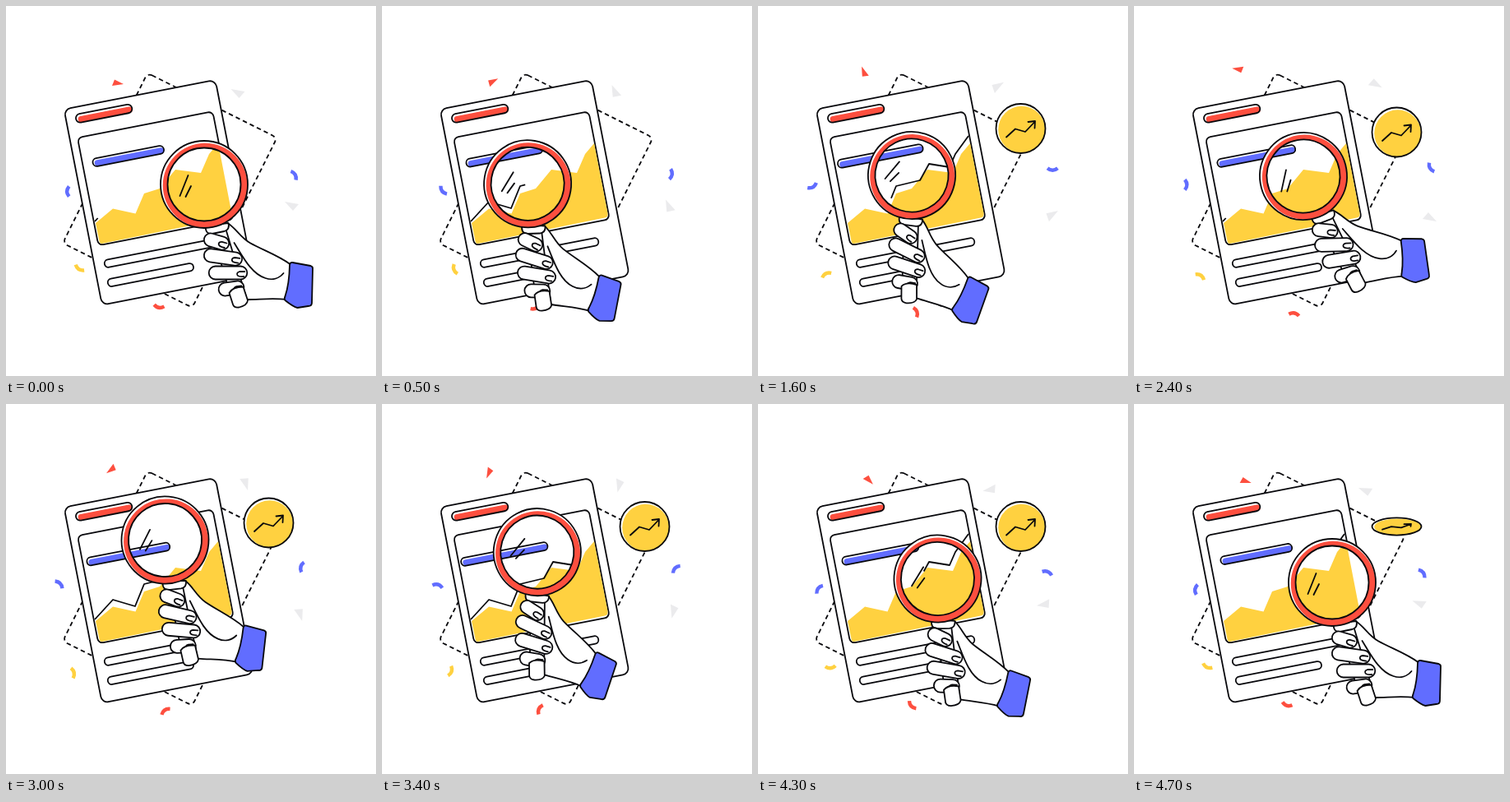
These frames come from a looping animation (450x450 px, 4.8 s). An HTML page:

```html
<!DOCTYPE html>
<html lang="en">
<head>
<meta charset="utf-8">
<title>Report under a magnifier</title>
<style>
  html, body { margin: 0; width: 100%; height: 100%; overflow: hidden; background: #fff; }
  svg { display: block; width: 100vw; height: 100vh; }
  .ink { fill: none; stroke: #08080c; stroke-width: 1.8; stroke-linecap: round; stroke-linejoin: round; }
  .flat { stroke-linecap: butt; }
  .paper { fill: #fff; }
  .red { fill: #fd4f3f; }
  .blue { fill: #616dff; }
  .yellow { fill: #ffd140; }
  .gray { fill: #ebebed; }
  .arc { fill: none; stroke-width: 4.4; }
  .arc.red { stroke: #fd4f3f; }
  .arc.blue { stroke: #616dff; }
  .arc.yellow { stroke: #ffd140; }
  #badge .ink { vector-effect: non-scaling-stroke; }
</style>
</head>
<body>
<svg viewBox="0 0 450 450">
  <rect class="ink flat" x="-88.5" y="-115" width="176" height="231" rx="6" stroke-dasharray="5.5 4"
        transform="translate(200 224) rotate(26.5)"/>

  <g id="confetti"></g>

  <g id="badge">
    <circle class="paper" r="30"/>
    <circle class="yellow" cx="1.2" cy="1.3" r="28.5"/>
    <circle class="ink" r="30"/>
    <path class="ink" d="M-17.5 10.5 L-6.5 .5 L5.5 4 L17.5 -8.5 M9 -8 L17.5 -9 L17 -.5"/>
  </g>

  <g transform="translate(186 227) rotate(-11)">
    <rect class="ink paper" x="-94" y="-121.5" width="187.500" height="242.5" rx="8"/>
    <rect class="ink" x="-84.5" y="-84.5" width="167.5" height="133.500" rx="6"/>
    <rect class="red" x="-79.5" y="-109.5" width="67" height="7.5" rx="3.7"/>
    <rect class="ink" x="-82" y="-112.5" width="69.5" height="10.5" rx="5.2"/>
    <rect class="ink" x="-81.5" y="68" width="146" height="9.5" rx="4.7"/>
    <rect class="ink" x="-82" y="91.5" width="106" height="9.5" rx="4.7"/>
  </g>

  <circle id="glass" class="paper" r="46"/>

  <path class="yellow" d="M109 264 L130 246.5 L157.5 252.5 L168 228 L187 222 L206 199 L237 203 L247 180 L258 167
                          L274.5 252 Q275 257 271 257.5 L119 288.5 Q114 290 113.5 286 Z"/>
  <path id="trend" class="ink flat" pathLength="1"
        d="M108 262 L130 238 L157 246 L168 219 L197 212 L208 192 L233 196 L240 180 L256 158"/>
  <g transform="translate(148.800 182.5) rotate(-11)">
    <rect id="barFill" class="blue" y="-2.5" height="7.5" rx="3.7"/>
    <rect id="barLine" class="ink" y="-5" height="10" rx="5"/>
  </g>

  <g id="hand">
    <path class="ink" d="M221 206 L211 231 M224.5 219 L218 232"/>

    <!-- palm, wrist and cuff -->
    <path class="paper" d="M269 264 C279 270 284 281 296 288 C312 297 330 303 345 314 L340 357 C325 355 308 357 293 357 L262 330 Z"/>
    <path class="ink" d="M269 264 C279 270 284 281 296 288 C312 297 330 303 345 314 M340 357 C325 355 308 357 293 357"/>
    <path class="ink" d="M277 288 C287 304 298 326 315 331 C324 334 332 331 337 325"/>
    <path class="ink blue" d="M348 312 L370 316 Q373 317 372.5 320 L371.5 361 Q371.500 365 367 365 L354 367 Q349 366 339 358 Q337.500 356 339 353 Q344 338 344.500 315 Q345 311.500 348 312 Z"/>

    <!-- handle, collar, fingers, handle end -->
    <path class="ink paper" d="M250 276 L274 356 L291 352 L267 272 Z"/>
    <path class="ink paper" d="M242 267 Q242 278 250 277 L265 274 Q272 272 270 264 Z"/>
    <g id="fingers"></g>
    <path class="ink paper" d="M271 349 Q275 341.500 288 341.500 L293.500 358 Q293 364 283 366.500 Q277 367.500 275.500 363 Z"/>

    <!-- rim, lit from the upper left -->
    <g transform="translate(240.5 217)">
      <circle r="48.7" fill="none" stroke="#fff" stroke-width="8.5"/>
      <path class="red" fill-rule="evenodd"
            d="M-50.3 1.3 a51.5 51.5 0 1 0 103 0 a51.5 51.5 0 1 0 -103 0 M-44.5 0 a44.5 44.5 0 1 0 89 0 a44.5 44.5 0 1 0 -89 0"/>
      <circle class="ink" r="53"/>
      <circle class="ink" r="44.500"/>
    </g>
  </g>
</svg>

<script>
const LOOP = 4800, STEP = 100, TAU = 2 * Math.PI;
const $ = id => document.getElementById(id);
const ramp = (t, from, to) => Math.min(1, Math.max(0, (t - from) / (to - from)));
const smooth = u => u * u * (3 - 2 * u);

function set(el, attrs) {
  for (const name in attrs) el.setAttribute(name, attrs[name]);
  return el;
}
const add = (parent, tag, attrs) =>
  parent.appendChild(set(document.createElementNS('http://www.w3.org/2000/svg', tag), attrs));

// Smooth curve through keys [time, ...values], without overshoot.
function curve(keys, t) {
  let i = 0;
  while (i < keys.length - 2 && t >= keys[i + 1][0]) i++;
  const a = keys[i], b = keys[i + 1], u = ramp(t, a[0], b[0]);
  const slope = (k, c) => (keys[k + 1][c] - keys[k][c]) / (keys[k + 1][0] - keys[k][0]);
  const tangent = (k, c) => {
    if (k < 1 || k > keys.length - 2) return 0;
    const p = slope(k - 1, c), q = slope(k, c);
    return p * q > 0 ? 2 * p * q / (p + q) : 0;
  };
  return a.slice(1).map((from, n) => {
    const c = n + 1, pull = (1 - u) * tangent(i, c) - u * tangent(i + 1, c);
    return from + (b[c] - from) * smooth(u) + (b[0] - a[0]) * u * (1 - u) * pull;
  });
}

// Poses of the magnifier: time, lens x, lens y, turn.
const rest = [241, 217, 0];
const poses = [
  [0, ...rest], [600, 172, 216, 11], [1600, 187, 206, 18.3], [2400, 206, 207, -9.5],
  [2600, 222, 193, -10], [3000, 193.5, 165.5, 5], [3800, 187, 200, 23.6], [4700, ...rest]
];

for (let i = 0; i < 4; i++) {
  const w = 31 + 18 * Math.sin(Math.PI * i / 3);
  const finger = add($('fingers'), 'g', {
    transform: `translate(${255.5 + 9 * i - i * i} ${286.5 + 19 * i}) rotate(${16 - 8 * i})` });
  add(finger, 'rect', { class: 'ink paper', x: -w / 2, y: -8, width: w, height: 16, rx: 8 });
  add(finger, 'path', { class: 'ink', d: 'M5 -3 L-1 -3 Q-5 -2 -4 1 Q-3 3.5 4 3',
    transform: `translate(${w / 2 - 8} 1.5)` });
}

const arc = 'M-6.2 -1.7 Q0 3.4 6.2 -1.7', chip = 'M-8 -5 L9 -2 L2 6 Z', shard = 'M8 1 L-6 3 L-3 -4.5 Z';
const bits = [];
function bit(d, look, x, y, heading, reach, angle, spin) {
  const el = add($('confetti'), 'path', { d, class: look });
  const dx = reach * Math.cos(heading * TAU / 360), dy = reach * Math.sin(heading * TAU / 360);
  bits.push((drift, turn) => set(el, {
    transform: `translate(${x + dx * drift} ${y + dy * drift}) rotate(${angle + spin * turn})` }));
}
bit(shard, 'red', 135, 94, -114, 19, 0, -1);
bit(chip, 'gray', 281.5, 106, -44, 17, 0, 1);
bit(chip, 'gray', 347, 243, 47, 19, 0, 1);
bit(arc, 'arc blue', 351, 205.5, -42, 13, -120, 1);
bit(arc, 'arc blue', 75, 225.5, 215, 14, 90, -1);
bit(arc, 'arc yellow', 89, 319.5, 133, 12, 33, 1);
bit(arc, 'arc red', 186, 366, 43, 12, 10, -1);

function draw(t) {
  const w = TAU * t / LOOP;

  const [x, y, turn] = curve(poses, t);
  set($('hand'), { transform: `translate(${x} ${y}) rotate(${turn}) translate(-240.5 -217)` });
  set($('glass'), { transform: `translate(${x} ${y})` });

  // The badge pops up with an overshoot, bobs once and folds flat.
  const v = ramp(t, 500, 1200) - 1, size = 1 + 2.7 * v ** 3 + 1.7 * v ** 2;
  const fold = 1 - smooth(ramp(t, 4550, LOOP));
  const bob = 4.5 * Math.sin(TAU * ramp(t, 2100, 3300));
  set($('badge'), {
    transform: `translate(319.5 ${149 + bob}) scale(${size} ${size * fold})`,
    visibility: size > .001 ? 'visible' : 'hidden' });

  const bar = 99.6 - 7.4 * Math.cos(2 * w) - 4.2 * Math.cos(w);
  set($('barLine'), { x: -bar / 2, width: bar });
  set($('barFill'), { x: 2 - bar / 2, width: bar - 2 });

  // The trend line is drawn, then erased from its start, twice per loop.
  const phase = t % (LOOP / 2), start = ramp(phase, 1200, 2350), end = ramp(phase, -30, 1140);
  set($('trend'), { 'stroke-dasharray': `0 ${start} ${end - start} 2` });

  for (const move of bits) move((1 - Math.cos(w)) / 2, 360 * t / LOOP);
}

const began = performance.now();
function tick() {
  const t = (performance.now() - began) % LOOP;
  draw(Math.floor(t / STEP) * STEP);
  requestAnimationFrame(tick);
}
tick();
</script>
</body>
</html>
```
